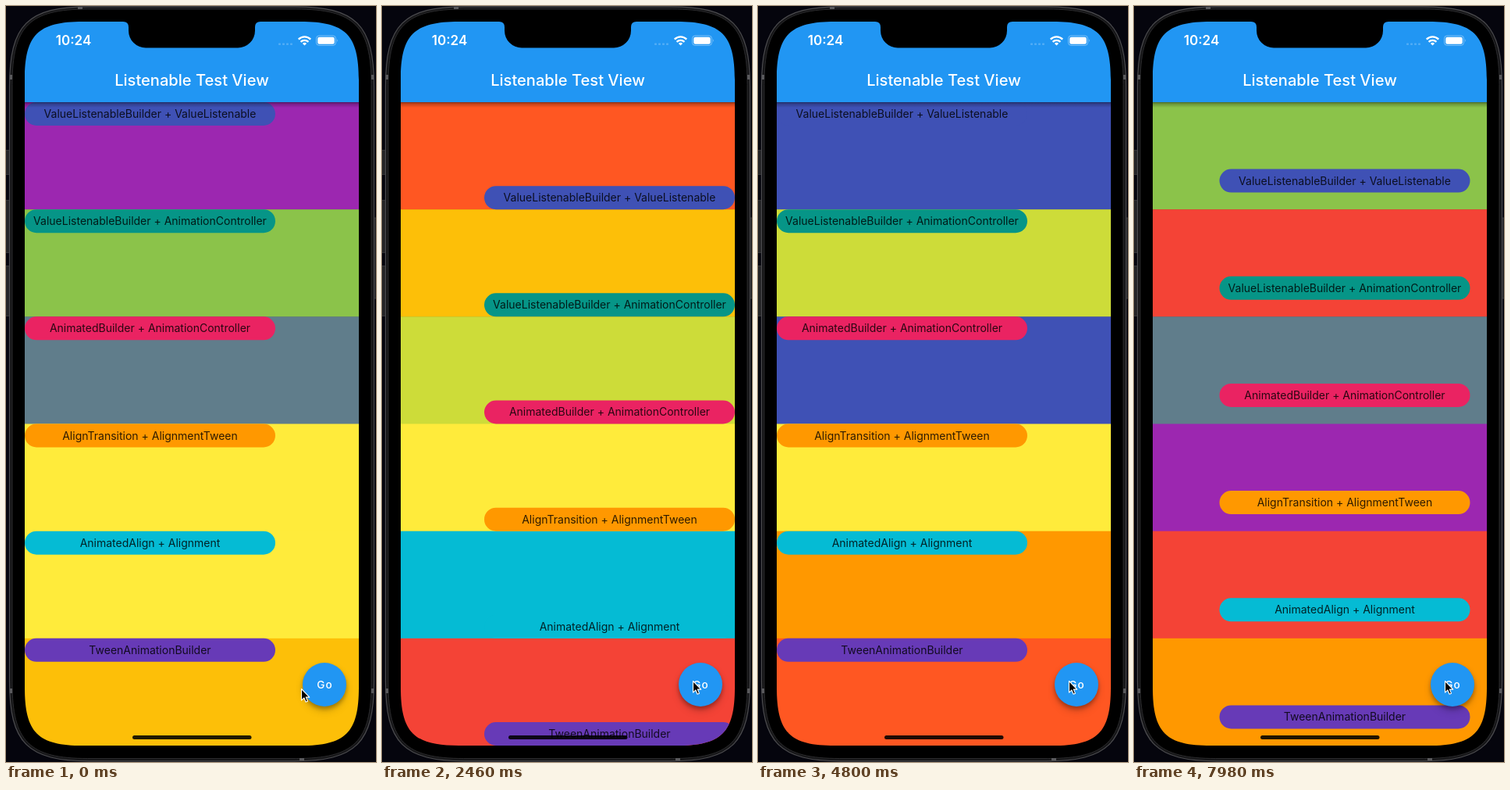
Write an HTML page that moves like this. It is 474 px wide and 967 px high and loops after 8 s.

```html
<!DOCTYPE html>
<html lang="en">
<head>
<meta charset="utf-8">
<title>Listenable Test View</title>
<style>
  html, body { margin: 0; width: 100%; height: 100%; overflow: hidden; background: #05050d; }
  svg { display: block; width: 474px; height: 967px; }
  text { font-family: Inter, Roboto, sans-serif; text-anchor: middle; fill: #fff; }
  .pill text { font-size: 14px; fill: #000; fill-opacity: .82; }
  .title { font-size: 20.1px; font-weight: 500; }
  .clock { font-size: 17px; font-weight: 600; }
  .go { font-size: 13.6px; font-weight: 500; letter-spacing: 1px; }
  .fab {
    filter: drop-shadow(0 3px 2.5px rgba(0, 0, 0, .24)) drop-shadow(0 5px 4px rgba(0, 0, 0, .2));
  }
</style>
</head>
<body>
<svg viewBox="0 0 474 967">
  <defs>
    <clipPath id="screen"><path id="glass"/></clipPath>
    <clipPath id="button"><circle cx="408" cy="868" r="28"/></clipPath>
    <linearGradient id="barShade" x1="0" y1="0" x2="0" y2="1">
      <stop offset="0" stop-color="#000" stop-opacity=".45"/>
      <stop offset=".35" stop-color="#000" stop-opacity=".22"/>
      <stop offset="1" stop-color="#000" stop-opacity="0"/>
    </linearGradient>
  </defs>

  <!-- phone body -->
  <g fill="#242426" stroke="#3c3c3f" stroke-width=".8">
    <rect x="-2" y="184.5" width="7" height="31"/>
    <rect x="-2" y="248.5" width="7" height="67"/>
    <rect x="-2" y="332.5" width="7" height="64"/>
    <rect x="470" y="271" width="7" height="103"/>
  </g>
  <path id="band" fill="#161618" stroke="#4b4b4e" stroke-width="1.2"/>
  <path id="bezel" stroke="#2a2a2c"/>
  <g fill="#5a5a5d">
    <rect x="92" y="1" width="6" height="3"/>
    <rect x="376" y="962" width="6" height="3"/>
    <rect x="5" y="88" width="3" height="6"/>
    <rect x="468" y="88" width="3" height="6"/>
    <rect x="5" y="873" width="3" height="6"/>
    <rect x="468" y="873" width="3" height="6"/>
  </g>

  <g clip-path="url(#screen)">
    <g id="rows"></g>
    <g id="pills"></g>

    <rect x="24" y="123" width="428" height="7" fill="url(#barShade)"/>
    <rect x="24" y="20" width="428" height="103" fill="#2196f3"/>
    <text class="title" x="238" y="102">Listenable Test View</text>

    <!-- status bar -->
    <text class="clock" x="86.5" y="50.2">10:24</text>
    <g fill="#fff" fill-opacity=".22">
      <rect x="349" y="47.5" width="3" height="2.5" rx="1"/>
      <rect x="354" y="47.5" width="3" height="2.5" rx="1"/>
      <rect x="359" y="47.5" width="3" height="2.5" rx="1"/>
      <rect x="364" y="47.5" width="3" height="2.5" rx="1"/>
    </g>
    <g fill="none" stroke="#fff" stroke-width="2.4">
      <path d="M374.8 42.6a10.8 10.8 0 0 1 15.4 0"/>
      <path d="M377.6 45.9a6.9 6.9 0 0 1 9.8 0"/>
    </g>
    <path d="M382.5 50.6l-2.6-2.7a3.8 3.8 0 0 1 5.2 0z" fill="#fff"/>
    <rect x="397.5" y="38" width="25" height="12.4" rx="3.6" fill="none" stroke="#fff" stroke-opacity=".4"/>
    <rect x="399.2" y="39.7" width="21.6" height="9" rx="2.2" fill="#fff"/>
    <path d="M424 42.2q1.7 2 0 4z" fill="#fff" fill-opacity=".5"/>

    <path d="M150 19.5h176v.5q-7 0-7 7v4.5a22 22 0 0 1-22 22h-118a22 22 0 0 1-22-22v-4.5q0-7-7-7z"/>

    <circle class="fab" cx="408" cy="868" r="28" fill="#2196f3"/>
    <circle id="splash" cx="402" cy="868" r="0" fill="#fff" clip-path="url(#button)"/>
    <text class="go" x="408.5" y="873">Go</text>
    <rect x="162" y="933" width="152.5" height="5" rx="2.5" fill="#000" fill-opacity=".87"/>
  </g>

  <path id="cursor" d="M0 0V14.6L3.4 11.5 5.6 16.7 8 15.7 5.8 10.6H10.3Z"
        stroke="#fff" stroke-width="1.1" stroke-linejoin="round"/>
</svg>

<script>
const LOOP = 8000, STEP = 60, SLIDE = 1800;
const TOP = 123, ROW = 823 / 6, PILL = 30;
const TRAVEL_X = 107, TRAVEL_Y = ROW - PILL;
const hue = {
  purple: '#9c27b0', lightGreen: '#8bc34a', blueGrey: '#607d8b', yellow: '#ffeb3b',
  amber: '#fdbf08', deepOrange: '#ff5722', lime: '#cddc39', cyan: '#05bbd4',
  red: '#f44336', indigo: '#3f51b5', orange: '#ff9800', green: '#4caf50',
  brown: '#795548', teal: '#069587', deepPurple: '#673ab7', pink: '#ea2362'
};
const palettes = [
  'purple lightGreen blueGrey yellow yellow amber',
  'deepOrange amber lime yellow cyan red',
  'indigo lime indigo yellow orange deepOrange',
  'green brown teal deepPurple deepOrange cyan',
  'lightGreen red blueGrey purple red orange'
].map(names => names.split(' '));
const labels = [
  ['ValueListenableBuilder + ValueListenable', 'indigo'],
  ['ValueListenableBuilder + AnimationController', 'teal'],
  ['AnimatedBuilder + AnimationController', 'pink'],
  ['AlignTransition + AlignmentTween', 'orange'],
  ['AnimatedAlign + Alignment', 'cyan'],
  ['TweenAnimationBuilder', 'deepPurple']
];
// Each tap: finger down, then release, which recolours the rows and slides the pills.
const taps = [[480, 615], [2760, 2894], [5040, 5222], [7380, 7618]];

const $ = id => document.getElementById(id);
const clamp = v => Math.min(1, Math.max(0, v));

function add(parent, tag, attrs) {
  const el = document.createElementNS('http://www.w3.org/2000/svg', tag);
  for (const key in attrs) el.setAttribute(key, attrs[key]);
  return parent.appendChild(el);
}

// Rectangle whose corners ease into the sides instead of being plain arcs.
function smoothRect(id, x, y, w, h, r) {
  const a = 1.4 * r, b = 0.314 * r, c = a - b;
  $(id).setAttribute('d', `M${x} ${y + a}c0 ${-c} ${b} ${-a} ${a} ${-a}h${w - 2 * a}
    c${c} 0 ${a} ${b} ${a} ${a}v${h - 2 * a}c0 ${c} ${-b} ${a} ${-a} ${a}h${2 * a - w}
    c${-c} 0 ${-a} ${-b} ${-a} ${-a}z`);
}
smoothRect('glass', 24, 20, 428, 926, 53.3);
smoothRect('bezel', 8, 4, 460, 958.5, 69);
smoothRect('band', 4.5, 0.8, 467, 965, 73);

const rows = labels.map(([label, color], i) => {
  const y = TOP + i * ROW;
  const pill = add($('pills'), 'g', { class: 'pill' });
  add(pill, 'rect', { x: 24, y, width: 321, height: PILL, rx: PILL / 2, fill: hue[color] });
  add(pill, 'text', { x: 184.5, y: y + 20 }).textContent = label;
  return add($('rows'), 'rect', { x: 24, y, width: 428, height: ROW + 0.5 });
});

function draw(time) {
  const t = Math.floor(time % LOOP / STEP) * STEP;

  const count = taps.filter(([, up]) => up <= t).length;
  rows.forEach((row, i) => row.setAttribute('fill', hue[palettes[count][i]]));

  let pos = 0;
  if (count) {
    const p = clamp((t - taps[count - 1][1]) / SLIDE);
    pos = count % 2 ? p : 1 - p;
  }
  $('pills').setAttribute('transform', `translate(${TRAVEL_X * pos} ${TRAVEL_Y * pos})`);

  const tap = taps.filter(([down]) => down <= t).pop();
  const age = tap ? t - tap[0] : LOOP;
  $('splash').setAttribute('r', 34 * clamp(age / 240));
  $('splash').setAttribute('opacity', 0.2 * clamp((400 - age) / 200));

  const m = clamp(t / 420);
  $('cursor').setAttribute('transform', `translate(${378.5 + 20 * m} ${873.5 - 10 * m})`);
}

const start = performance.now();
function tick() {
  draw(performance.now() - start);
  requestAnimationFrame(tick);
}
tick();
</script>
</body>
</html>
```
